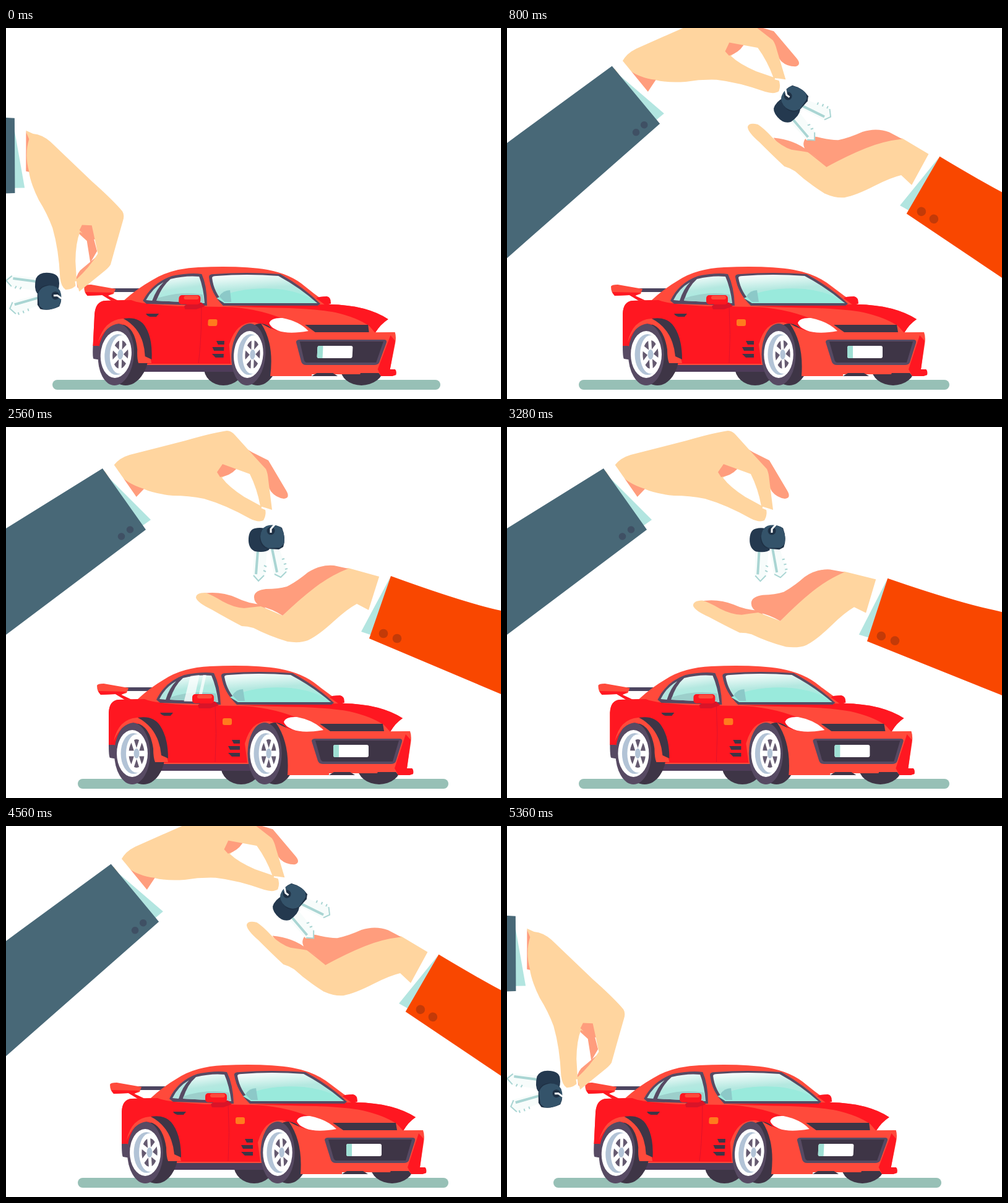
An HTML page for the animation above (5.44 s loop, 800 by 600 pixels).

```html
<!DOCTYPE html>
<html lang="en">
<head>
<meta charset="utf-8">
<title>Car keys</title>
<style>
html, body { margin: 0; width: 100%; height: 100%; overflow: hidden; background: #fff; }
svg { display: block; width: 100vw; height: 100vh; }
.red { fill: #ff1721; }
.coral { fill: #ff4a3b; }
.dark { fill: #3e3546; }
.plum { fill: #574a63; }
.skin { fill: #ffd59f; }
.shade { fill: #ff9d7d; }
.mint { fill: #b2e5e0; }
.white { fill: #fff; }
</style>
</head>
<body>
<svg viewBox="0 0 800 600">
<defs>
  <linearGradient id="glass" x1="0" y1="0" x2="0.25" y2="1">
    <stop offset="0" stop-color="#fff"/>
    <stop offset="0.25" stop-color="#dcf5f1"/>
    <stop offset="0.55" stop-color="#b4e8e0"/>
    <stop offset="1" stop-color="#a3ece0"/>
  </linearGradient>
  <clipPath id="panes">
    <path d="M263 440Q270 416 284 406Q310 399 332 402Q340 420 343 445L258 443Z"/>
    <path d="M353 401Q405 397 460 401Q496 420 525 444H374Q357 428 352 403Z"/>
  </clipPath>
  <g id="wheel">
    <ellipse class="dark" cx="18" rx="35" ry="50"/>
    <ellipse class="plum" rx="29" ry="50"/>
    <ellipse class="white" rx="25" ry="38"/>
    <ellipse cx="2" rx="20.5" ry="33" fill="#b2c3d6"/>
    <ellipse class="white" cx="7" rx="17" ry="31"/>
    <g transform="translate(7 0) scale(.55 1)">
      <circle r="23" fill="#655a70"/>
      <g id="spokes" stroke="#fff" stroke-width="9"></g>
      <circle r="8" fill="#b2c3d6"/>
    </g>
  </g>
</defs>

<rect id="ground" y="569" height="16" rx="8" fill="#97c0b6"/>

<g id="car">
  <ellipse class="dark" cx="380" cy="548" rx="33" ry="30"/>
  <ellipse class="dark" cx="603" cy="550" rx="35" ry="28"/>
  <path fill="#4f3c5a" d="M235 536H410V556H250Z"/>
  <path fill="#4d4560" d="M190 421H240L232 427H190Z"/>
  <path class="coral" d="M147 418Q148 415 158 415L198 422L195 430L186 433L203 441H192L177 432L153 433Q147 428 147 418Z"/>
  <path class="red" d="M149 427L195 428L186 433L203 441H192L177 432L153 433Z"/>
  <path class="plum" d="M166 513H180V537L168 535Q166 533 166 513Z"/>
  <path class="coral" d="M166 514V462Q167 442 182 441L213 440Q232 422 256 408Q285 389 330 387Q400 384 442 391Q480 398 504 418Q524 434 545 447Q605 448 641 471Q629 479 621 493L600 560H456L440 545H240L175 514Z"/>
  <path class="red" d="M166 514V462Q167 442 182 441L224 440Q240 447 300 450L375 451Q425 452 470 470L480 492L455 500L450 550L440 543H240L175 514Z"/>
  <path class="red" d="M380 450L545 447Q605 448 641 471Q629 479 621 493L611 482Q590 468 555 460Q530 455 480 453Q420 452 380 450Z"/>
  <path class="coral" d="M386 512Q396 474 425 476Q462 482 462 545L390 543Z"/>
  <path d="M338 450Q341 495 338 542" fill="none" stroke="#e0132b"/>

  <!-- windows -->
  <path class="plum" d="M243 441Q257 412 288 401Q318 395 336 398Q346 418 347 449L249 446Z"/>
  <path fill="url(#glass)" d="M265 441Q272 418 286 406Q310 400 332 402Q340 420 343 445Z"/>
  <path fill="#9ccfcb" d="M266 437Q302 425 339 431L342 445L265 441Z"/>
  <path class="mint" d="M248 440Q257 421 275 411Q264 422 258 441Z"/>
  <path class="plum" d="M348 403Q347 398 356 398Q408 394 463 398Q503 420 530 446L526 449H373Q352 429 348 403Z"/>
  <path fill="url(#glass)" d="M353 404Q353 401 360 401Q408 397 460 401Q496 420 525 445H375Q357 428 353 404Z"/>
  <path fill="#99eadc" d="M362 437Q400 418 460 422Q500 426 525 445H375Z"/>
  <path fill="#8cc9c8" d="M366 434Q372 424 383 424L386 443H375Z"/>
  <g clip-path="url(#panes)"><path id="glare" fill="#fff" opacity=".75" d="M0 395H14L2 450H-14ZM20 395H25L13 450H8Z"/></g>
  <path fill="#d91428" d="M310 450L318 444H338L344 450L330 455H312Z"/>
  <rect class="red" x="301" y="432" width="35" height="15" rx="5"/>
  <rect class="coral" x="309" y="433" width="24" height="6" rx="3"/>
  <path class="red" d="M523 437Q526 434 540 434Q547 435 547 446L538 448Z"/>

  <path class="dark" d="M249 462H270L266 467H256Q251 466 249 462Z"/>
  <rect x="350" y="471" width="15" height="11" rx="3" fill="#ff7b1d"/>
  <path class="dark" d="M365 506H378V512H368ZM359 516H378V522H362ZM359 527H378V533H365Z"/>

  <use href="#wheel" x="204" y="528"/>
  <use href="#wheel" transform="translate(418 528) scale(.95 1)"/>

  <!-- rear arch over the tyre -->
  <path class="coral" d="M174 508Q182 472 212 470Q248 472 262 542H241Q238 535 238 520Q232 480 206 478Q186 480 174 508Z"/>
  <path class="dark" d="M213 470Q238 466 249 483Q262 502 262 536L251 531Q247 488 213 470Z"/>

  <!-- front end -->
  <path class="coral" d="M436 478Q464 494 490 493L653 492Q656 500 654 512L648 552H656Q659 554 658 561L652 563H634L630 558H522V563H455Q459 510 436 478Z"/>
  <path class="red" d="M646 497L654 506L648 552H656Q659 554 658 561L652 563H634L628 552Z"/>
  <path class="white" d="M449 477Q452 468 470 469Q497 474 513 490Q480 496 463 489Q451 484 449 477Z"/>
  <path class="dark" d="M507 480H609L611 492H524Z"/>
  <path class="plum" d="M494 508Q494 504 500 504H636Q641 504 640 509L630 541Q628 545 622 545H512Q506 545 504 540Z"/>
  <path class="dark" d="M500 507H635L625 541H512Q509 540 508 536Z"/>
  <rect class="white" x="529" y="514" width="57" height="20" rx="3"/>
  <path fill="#9fe0d4" d="M538 514H532Q529 514 529 517V531Q529 534 532 534H538Z"/>
  <path class="dark" d="M522 563L530 558H556L564 563Z"/>
</g>

<g id="armR">
  <g id="handR">
    <path id="strip" class="shade" d="M312 270Q345 264 372 276Q392 286 414 287L425 300L385 305L330 285Z"/>
    <path class="skin" d="M307 276Q307 268 322 268Q332 271 350 282Q368 292 385 293Q402 291 412 290L447 305L480 270Q515 236 553 228L625 248L606 305L586 296L567 286Q552 294 530 314Q505 337 488 345Q475 350 455 347Q425 338 400 325Q390 322 381 322Q358 310 332 295Q309 284 307 276Z"/>
    <path class="shade" d="M401 274Q402 264 420 262Q440 262 454 258Q470 250 488 235Q508 222 530 224L553 229Q525 240 500 259Q475 278 447 305Q430 294 412 290Q400 284 401 274Z"/>
  </g>
  <path class="white" d="M605 236L586 296L574 331L590 345L630 242Z"/>
  <path class="mint" d="M621 243L574 331L592 337Z"/>
  <path fill="#f94700" d="M622 241Q740 284 800 297L990 350V512L800 432L587 342Z"/>
  <g fill="#c33a08"><circle cx="610" cy="334" r="7.3"/><circle cx="632" cy="342" r="7.3"/></g>
</g>

<g id="armL">
  <g id="handL">
    <path id="finger" class="shade" d="M380 30L398 41L424 54L453 103Q460 115 449 116Q436 114 428 104L410 70Z"/>
    <path id="inner" class="shade" d="M360 43L404 57L414 76L381 62L360 68Z"/>
    <path class="skin" d="M150 78L174 62Q183 50 200 45L290 22Q335 9 357 6Q364 6 370 13L398 44L420 68Q423 74 424 86L430 134L411 128Q406 100 394 76L372 68L349 82Q360 97 385 113L418 131Q422 140 416 151Q408 155 394 148Q355 126 320 116Q295 111 270 111Q240 108 222 100L190 110Z"/>
    <path class="shade" d="M341 73L350 60L372 68Q362 79 346 81Z"/>
    <path class="shade" d="M165 70L178 72Q195 92 223 100L206 118Z"/>
    <path d="M413 130L429 137" stroke="#fff" stroke-width="2.5"/>
    <g id="keys">
      <g id="keyB">
        <path fill="#f7fcfb" d="M401 198L422 200L418 240L408 250L399 240Z"/>
        <path fill="none" stroke="#a9d5d3" stroke-width="4" d="M407 200L404 238"/>
        <path fill="none" stroke="#a9d5d3" stroke-width="2" d="M400 240L408 249L417 240M417 224L421 226M416 232L420 234"/>
        <path fill="#24394f" d="M392 180Q393 166 402 164Q415 161 424 167Q431 178 426 198Q418 204 402 201Q391 196 392 180Z"/>
      </g>
      <g id="keyF">
        <path fill="#f7fcfb" d="M425 196L441 194L454 234L444 244L433 238Z"/>
        <path fill="none" stroke="#a9d5d3" stroke-width="4" d="M430 197L438 235"/>
        <path fill="none" stroke="#a9d5d3" stroke-width="2" d="M434 238L444 243L453 234M446 214L450 213M449 222L453 221M451 230L455 229"/>
        <path fill="#1f3145" d="M410 180Q411 165 420 161Q434 156 446 163Q453 180 448 194L441 198L424 197Q411 194 410 180Z"/>
        <path fill="#34536a" d="M411 177Q412 164 421 160Q434 156 445 163Q452 176 449 189L443 195L424 196Q412 192 411 177Z"/>
        <circle cx="428" cy="168" r="6.5" fill="#1f3145"/>
        <path fill="none" stroke="#fff" stroke-width="3" d="M434 158L428 165V171"/>
      </g>
    </g>
  </g>
  <path class="white" d="M152 59L171 56L240 155L222 170Z"/>
  <path class="mint" d="M167 83L234 150L220 160Z"/>
  <path fill="#486877" d="M156 67L226 166L0 336L-130 434V245L0 164Z"/>
  <g fill="#3f5064"><circle cx="200.5" cy="166" r="5.8"/><circle cx="186.5" cy="177" r="5.8"/></g>
</g>
</svg>

<script>
const STEP = 80, LOOP = 5440, TURN = LOOP - STEP;
const TIMES = [0, 800, 1440, 2560];
const el = id => document.getElementById(id);
const move = (id, transform) => el(id).setAttribute('transform', transform);

for (let i = 0; i < 6; i++) {
  const a = i * Math.PI / 3;
  el('spokes').innerHTML += `<path d="M0 0L${27 * Math.cos(a)} ${27 * Math.sin(a)}"/>`;
}

// Smooth curve through the offsets at TIMES, coming to rest at 0.
function settle(p, ...offsets) {
  const v = [...offsets, 0];
  if (p >= TIMES[3]) return 0;
  const i = TIMES.findIndex(t => t > p) - 1;
  const secant = k => (v[k + 1] - v[k]) / (TIMES[k + 1] - TIMES[k]);
  const slope = k => {
    if (k === 0) return 1.5 * secant(0);
    if (k === 3) return 0;
    const a = secant(k - 1), b = secant(k);
    return a * b > 0 ? 2 * a * b / (a + b) : 0;
  };
  const span = TIMES[i + 1] - TIMES[i], u = (p - TIMES[i]) / span;
  const w = 1 - u;
  return v[i] * (1 + 2 * u) * w * w + v[i + 1] * u * u * (3 - 2 * u)
    + span * u * w * (slope(i) * w - slope(i + 1) * u);
}

function draw(now) {
  const t = Math.floor(now % LOOP / STEP) * STEP;
  const p = Math.min(t, TURN - t);   // plays forward, then back
  const at = (...offsets) => settle(p, ...offsets);

  const lean = at(-.05, 0, 0);
  const dx = at(-28, 21, 2);
  move('car', `matrix(1 0 ${lean} 1 ${dx - lean * 565} 0)`);
  move('spokes', `rotate(${dx * 1.15})`);
  move('glare', `translate(${300 + (p - 2560) * .25} 0)`);
  el('ground').setAttribute('x', 116 + at(-41, 0, 0));
  el('ground').setAttribute('width', 599 + at(28, 0, 0));

  move('armL', `translate(0 ${at(0, 10, 0)}) rotate(${at(35, -4.4, 0)} -40 -119)`);
  move('handL', `translate(${at(-1, 4, 0)} 0) rotate(${at(23, -5.1, 0)} 164 120)`);
  move('finger', `rotate(${at(20, 0, 0)} 385 35)`);
  move('inner', `translate(${at(-14, 0, 0)} ${at(18, 0, 0)})`);
  move('keys', `translate(${at(-13, 1, 0)} ${at(2.4, -7.6, 0)})`);
  move('keyF', `rotate(${at(28, -42.5, 4)} 429 168)`);
  move('keyB', `rotate(${at(35, -35.5, -5)} 429 168)`);

  move('armR', `rotate(${at(70, 11, -2.6)} 833 626)`);
  move('handR', `rotate(${at(12, 4.3, -1.7)} 612 280)`);
  move('strip', `translate(${at(50, 40, 0)} ${at(14, 12, 0)})`);
}

const start = performance.now();
function tick() {
  draw(performance.now() - start);
  requestAnimationFrame(tick);
}
tick();
</script>
</body>
</html>
```
